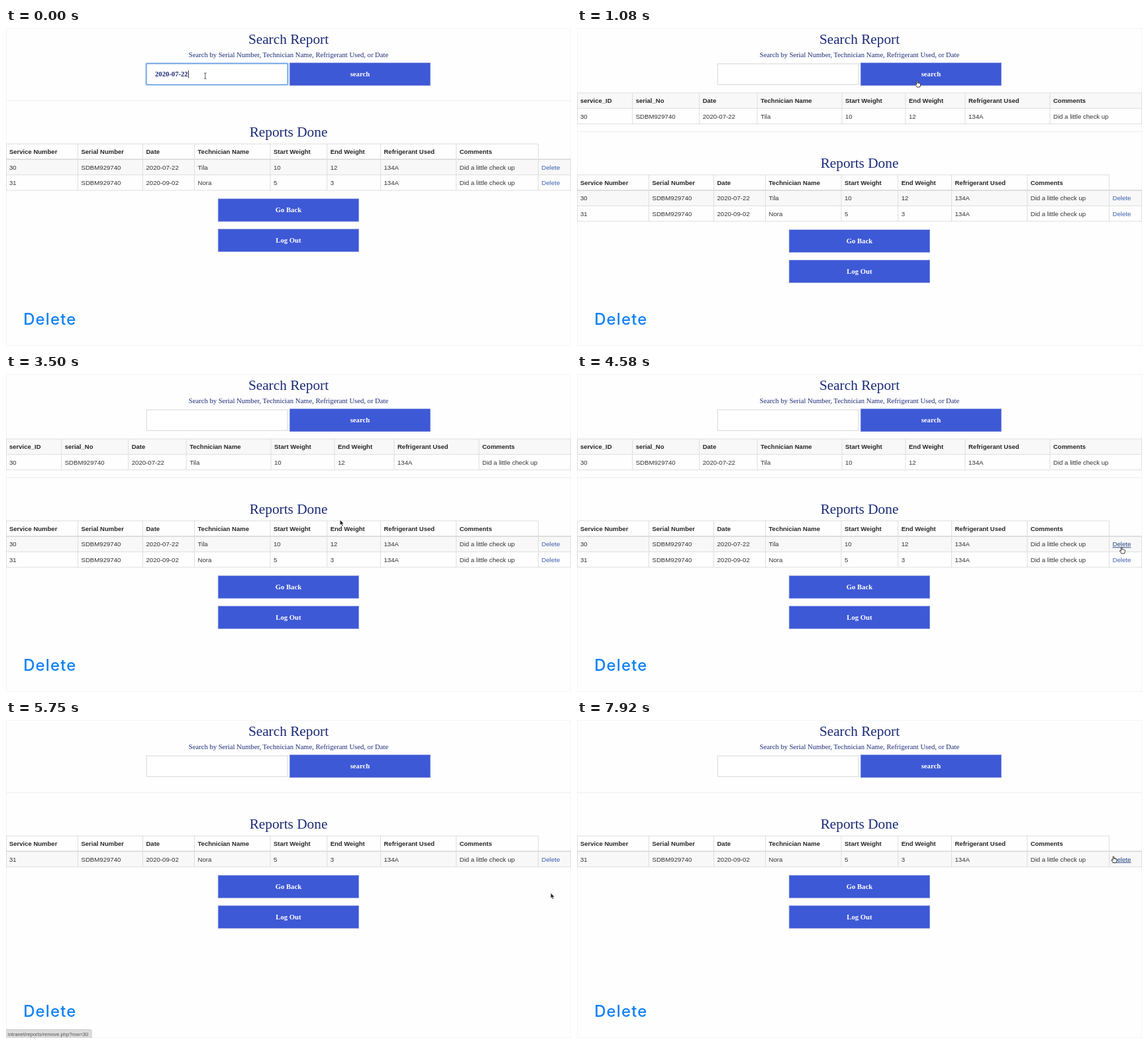
Recreate the animation shown at these times as an HTML page. Size 853 by 480 pixels, loop 8 s.

```html
<!DOCTYPE html>
<html lang="en">
<head>
<meta charset="utf-8">
<title>Search Report</title>
<style>
  html, body { margin: 0; width: 100%; height: 100%; overflow: hidden; background: #fefefe; }
  svg { display: block; width: 853px; height: 480px; }
  text { white-space: pre; }
  .serif { font-family: "Liberation Serif", "Times New Roman", serif; fill: #1b2b77; }
  .sans { font: 9.65px "Liberation Sans", Arial, sans-serif; fill: #333; }
  .head { font-weight: bold; font-size: 9.5px; fill: #262626; }
  .title { font-size: 21.3px; }
  .small { font-size: 10.63px; }
  .btn { font-size: 10.65px; font-weight: bold; fill: #fff; }
  .mid { text-anchor: middle; }
  .link { fill: #3b5fae; }
  .link.hover { fill: #24437f; text-decoration: underline; }
  .label { font: 500 24px Inter, sans-serif; letter-spacing: 1.1px; fill: #0f80f7; }
</style>
</head>
<body>
<svg id="stage" viewBox="0 0 853 480" xmlns="http://www.w3.org/2000/svg"></svg>
<script>
const LOOP = 8000, ROW = 23.35, SHIFT = 46.7;
const FOUND = 1000, STATUS_ON = 4640, DELETED = 5750, STATUS_OFF = 5960;

const text = (x, y, s, cls) => `<text x="${x}" y="${y}" class="${cls}">${s}</text>`;
const rect = (x, y, w, h, fill, extra = '') =>
  `<rect x="${x}" y="${y}" width="${w}" height="${h}" fill="${fill}" ${extra}/>`;
const line = (x1, y1, x2, y2, color = '#dedede', w = 1) =>
  `<path d="M${x1} ${y1}L${x2} ${y2}" stroke="${color}" stroke-width="${w}"/>`;
const button = (x, y, s) =>
  rect(x, y, 212.5, 34.2, '#3e59d6', 'stroke="#8d9be0" stroke-width=".6"') +
  text(x + 106.2, y + 20.4, s, 'serif btn mid');

// The last column of `cols` is the right edge; `open` leaves the last header cell blank.
function table(top, cols, rows, shade, open) {
  const last = cols[cols.length - 1];
  const bottom = top + ROW * rows.length;
  let out = '';
  rows.forEach((cells, r) => {
    const y = top + r * ROW;
    if (r === shade) out += rect(0, y, last, ROW, '#f8f8f8');
    cells.forEach((s, c) => {
      const cls = r === 0 ? 'sans head' : s === 'Delete' ? 'sans link' : 'sans';
      out += text(cols[c] + 5, y + 15.3, s, cls);
    });
  });
  for (let r = 0; r <= rows.length; r++) {
    const y = top + r * ROW;
    out += line(0, y, open && r === 0 ? cols[cols.length - 2] : last, y);
  }
  if (open) out += line(0, top + ROW, last, top + ROW, '#d8d8d8', 1.5);
  cols.forEach((x, c) => {
    const edge = c === 0 ? 0.5 : x === last ? x - 0.5 : x;
    out += line(edge, open && x === last ? top + ROW : top, edge, bottom);
  });
  return out;
}

const note = 'Did a little check up', serial = 'SDBM929740';
const tail = ['Technician Name', 'Start Weight', 'End Weight', 'Refrigerant Used', 'Comments'];
const first = ['30', serial, '2020-07-22', 'Tila', '10', '12', '134A', note];
const second = ['31', serial, '2020-09-02', 'Nora', '5', '3', '134A', note];

function reports(id, records) {
  const rows = [['Service Number', 'Serial Number', 'Date', ...tail],
    ...records.map(r => [...r, 'Delete'])];
  const end = 175 + ROW * rows.length;
  return `<g id="${id}">` + line(0, 109.7, 853, 109.7, '#eee') +
    text(426.5, 164.3, 'Reports Done', 'serif title mid') +
    table(175, [0, 108.5, 206.5, 284.5, 399, 484.7, 565.5, 679.7, 803.5, 853], rows, 1, true) +
    button(320.2, end + 12.8, 'Go Back') + button(320.2, end + 58.5, 'Log Out') + '</g>';
}

const stage = document.getElementById('stage');
stage.innerHTML =
  rect(0, 0, 853, 480, '#fefefe') +
  rect(0.5, 0.5, 852, 479, 'none', 'stroke="#f5f5f5"') +
  text(426.5, 24.3, 'Search Report', 'serif title mid') +
  text(426.5, 44, 'Search by Serial Number, Technician Name, Refrigerant Used, or Date', 'serif small mid') +
  rect(212.3, 54, 212.7, 31.3, '#fff', 'stroke="#d6d6d6"') +
  '<g id="focus">' +
  rect(211.8, 53.6, 213.6, 32, '#fff', 'stroke="#bcd6f5" stroke-width="3" rx="1"') +
  rect(212, 53.8, 213.2, 31.6, '#fff', 'stroke="#6ba2e4" stroke-width="1.5" rx="1"') +
  '<text x="225" y="73.2" class="serif" font-size="10.65" font-weight="bold">2020-07-22</text>' +
  '<path id="caret" d="M275.5 64v11.5" stroke="#222" stroke-width=".9"/></g>' +
  button(428.2, 52.7, 'search') +
  '<g id="result">' +
  table(98, [0, 83.7, 184.7, 272.2, 400, 496, 586, 714, 853],
    [['service_ID', 'serial_No', 'Date', ...tail], first], 0, false) + '</g>' +
  reports('both', [first, second]) + reports('one', [second]) +
  text(26.2, 448, 'Delete', 'label') +
  '<g id="status">' + rect(-1, 467.3, 130, 14, '#dcdcdc', 'stroke="#bdbdbd" stroke-width=".8" rx="1.5"') +
  '<text x="3" y="476.5" font-family="Liberation Sans, Arial, sans-serif" font-size="7.5" fill="#555">' +
  'intranet/reports/remove.php?row=30</text></g>' +
  '<g id="pointer">' +
  '<path id="beam" d="M-1.8 -4.5Q0 -4.5 0 -3.5Q0 -4.5 1.8 -4.5M0 -3.5V3.5M-1.8 4.5Q0 4.5 0 3.5Q0 4.5 1.8 4.5" fill="none" stroke="#444" stroke-width=".9"/>' +
  '<path id="arrow" d="M0 0V8.3L1.9 6.6L3.2 9.6L4.7 8.9L3.4 6.1H5.9Z" fill="#1c1c1c" stroke="#fff" stroke-width=".6"/>' +
  '<path id="hand" d="M-.8 .8Q0 -.4 .8 .8V4Q1.7 3.2 2.4 4.2Q3.3 3.5 3.9 4.5Q5 4 5.2 5.4Q5.2 8 4.1 10H-.2Q-1.3 8 -2.9 6.3Q-3 4.9 -1.8 5.4L-.8 6.4Z" fill="#fff" stroke="#222" stroke-width=".9" stroke-linejoin="round"/>' +
  '</g>';

const $ = id => document.getElementById(id);
const show = (id, on) => $(id).setAttribute('visibility', on ? 'visible' : 'hidden');
const linkA = stage.querySelector('#both .link'), linkC = stage.querySelector('#one .link');

// time, x, y of the pointer's hot spot
const path = [
  [0, 300.8, 72.3], [150, 300.8, 72.3], [800, 513.5, 79.2], [1300, 513.5, 79.2],
  [2000, 660.8, 117.4], [2500, 660.8, 117.4], [3400, 504.2, 220], [3750, 504.2, 220],
  [4550, 822.3, 261], [5800, 822.3, 261], [6380, 642.8, 197.8], [6900, 642.8, 197.8],
  [7880, 809.8, 205.5], [LOOP, 809.8, 205.5]
];

function pointerAt(t) {
  const i = path.findIndex(p => p[0] > t);
  const [t0, x0, y0] = path[i - 1], [t1, x1, y1] = path[i];
  const u = (t - t0) / (t1 - t0), k = u * u * (3 - 2 * u);
  return [x0 + (x1 - x0) * k, y0 + (y1 - y0) * k];
}

function render(t) {
  const [x, y] = pointerAt(t);
  const gone = t >= DELETED, found = t >= FOUND && !gone;
  const inside = (l, top, r, b) => x > l && x < r && y > top && y < b;
  const linkY = found ? 257 : 210;
  const onLink = inside(808, linkY - 6, 837, linkY + 6);
  const overField = inside(212, 54, 425, 86), overButton = inside(428, 52, 641, 87);

  show('focus', t < FOUND);
  show('caret', t < FOUND && t % 1000 < 500);
  show('result', found);
  show('both', !gone);
  show('one', gone);
  $('both').setAttribute('transform', `translate(0 ${found ? SHIFT : 0})`);
  linkA.classList.toggle('hover', onLink && !gone);
  linkC.classList.toggle('hover', onLink && gone);
  show('status', t >= STATUS_ON && t < STATUS_OFF);

  const hand = onLink || overButton;
  show('beam', overField);
  show('hand', hand);
  show('arrow', !overField && !hand);
  $('pointer').setAttribute('transform', `translate(${x.toFixed(2)} ${y.toFixed(2)})`);
}

const start = performance.now();
function tick() {
  render((performance.now() - start) % LOOP);
  requestAnimationFrame(tick);
}
render(0);
requestAnimationFrame(tick);
</script>
</body>
</html>
```
